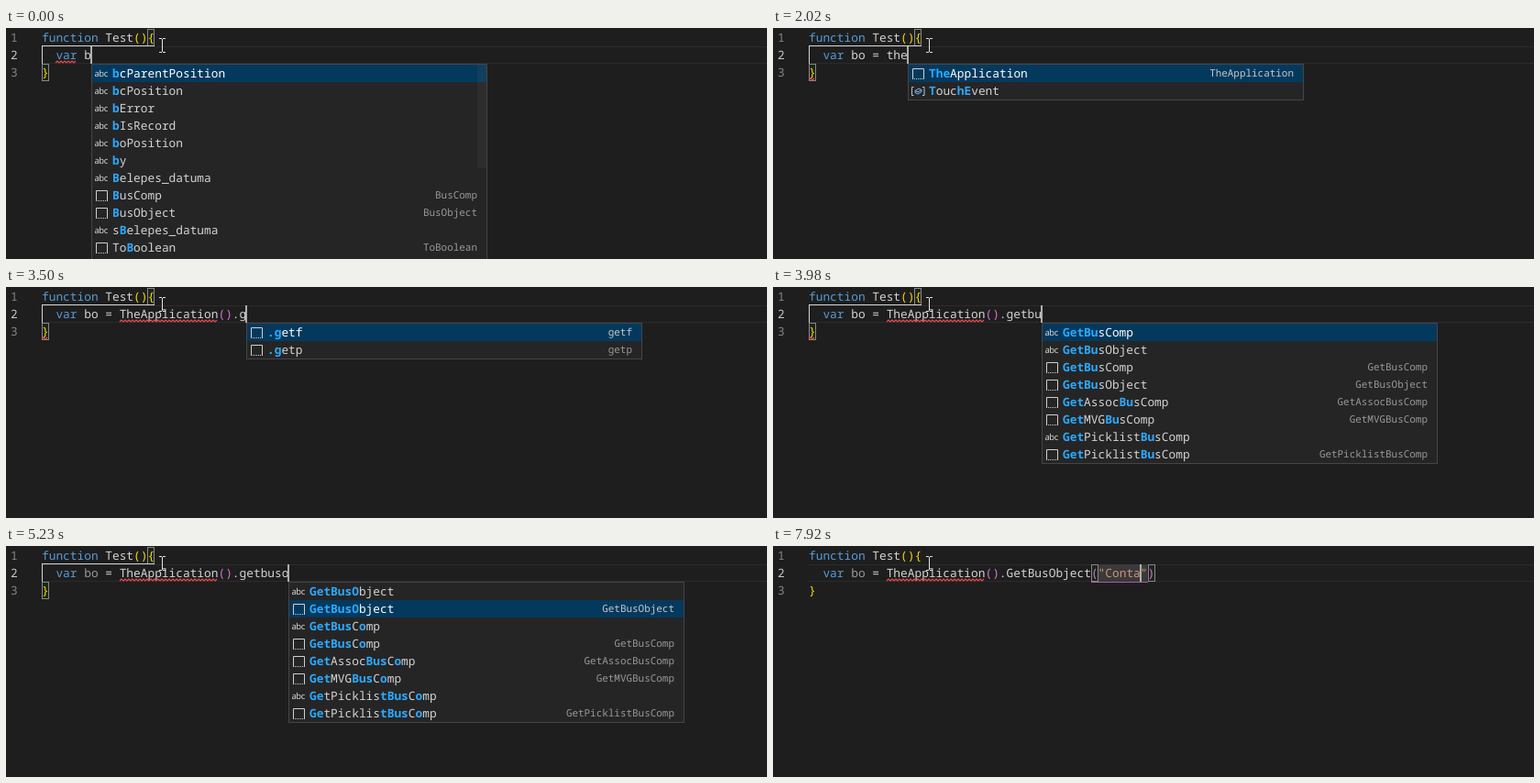
Write an HTML page that moves like this. It is 830 px wide and 252 px high and loops after 8 s.

```html
<!DOCTYPE html>
<html lang="en">
<head>
<meta charset="utf-8">
<title>Code completion</title>
<style>
  html, body { margin: 0; width: 100%; height: 100%; overflow: hidden; background: #1e1e1e; }
  svg { display: block; }
  text { font: 12.83px "Noto Sans Mono", "DejaVu Sans Mono", monospace; white-space: pre; text-rendering: geometricPrecision; fill: #d4d4d4; }
  .hit { fill: #2aaaff; font-weight: 700; }
  .detail { font-size: 10.95px; fill: #999; text-anchor: end; }
  .abc { font: 9.5px "Noto Sans", sans-serif; letter-spacing: -.5px; }
</style>
</head>
<body>
<svg id="stage" width="830" height="252" viewBox="0 0 830 252"></svg>
<script>
const LOOP = 8000, LEFT = 39, CHAR = 7.698, ROW = 19, POPUP_WIDTH = 432;
const BLUE = '#569cd6', GOLD = '#ffd700', ORCHID = '#da70d6', STRING = '#ce9178', RED = '#f14c4c';

// Label prefix: # snippet, @ event, none for a plain word.
const lists = {
  b: 'bcParentPosition bcPosition bError bIsRecord boPosition by Belepes_datuma #BusComp #BusObject sBelepes_datuma #ToBoolean #ToNumber',
  bo: 'boPosition bcParentPosition bcPosition bError bIsRecord #BusComp #BusObject #ToBoolean #GetBusComp #GetBusObject #GetAssocBusComp #GetMVGBusComp',
  th: '#TheApplication this throw @TouchEvent Math length match path',
  the: '#TheApplication @TouchEvent',
  app: '#TheApplication',
  dot: '#.getf #.getp #.setf #.setp #.try',
  get: '#.getf #.getp',
  bus: 'GetBusComp GetBusObject #GetBusComp #GetBusObject #GetAssocBusComp #GetMVGBusComp GetPicklistBusComp #GetPicklistBusComp',
  obj: 'GetBusObject #GetBusObject GetBusComp #GetBusComp #GetAssocBusComp #GetMVGBusComp GetPicklistBusComp #GetPicklistBusComp'
};

// [start, text with | as caret (¦ while blinked off), flags, list, selected row]
// flags: v/a/e squiggle under var/call/brace, g dimmed variable, p inner pair, m its match boxes
const APP = 'bo = TheApplication()', CALL = APP + '.GetBusObject(';
const steps = [
  [0, 'b|', 'v', 'b'],
  [150, 'bo|', 'v', 'bo'],
  [270, 'bo|', '', 'bo'],
  [540, 'bo |', 'g'],
  [950, 'bo =|', 'g'],
  [1210, 'bo = |', 'g'],
  [1610, 'bo = |', 'e'],
  [1760, 'bo = t|', 'e'],
  [1880, 'bo = th|', 'e', 'th'],
  [2020, 'bo = the|', 'e', 'the'],
  [2170, 'bo = thea|', 'e', 'app'],
  [2290, 'bo = theap|', 'e', 'app'],
  [2580, 'bo = TheApplication|', 'e'],
  [2710, 'bo = TheApplication(|)', 'gpm'],
  [2970, APP + '.|', 'g', 'dot'],
  [3220, APP + '.|', 'ae', 'dot'],
  [3370, APP + '.g|', 'ae'],
  [3500, APP + '.g|', 'ae', 'get'],
  [3620, APP + '.ge|', 'ae', 'get'],
  [3740, APP + '.get|', 'ae', 'get'],
  [3860, APP + '.getb|', 'ae', 'bus'],
  [3980, APP + '.getbu|', 'ae', 'bus'],
  [4100, APP + '.getbus|', 'ae', 'bus'],
  [4250, APP + '.getbuso|', 'ae', 'obj'],
  [4650, APP + '.getbuso|', 'ag', 'obj'],
  [4800, APP + '.getbuso¦', 'ag', 'obj'],
  [5230, APP + '.getbuso|', 'ag', 'obj', 1],
  [5380, CALL + '|)', 'agpm'],
  [5810, CALL + '"|")', 'agp'],
  [5940, CALL + '"|")', 'agpm'],
  [6350, CALL + '"¦")', 'agpm'],
  [6910, CALL + '"|")', 'agpm'],
  [7060, CALL + '"C|")', 'agpm'],
  [7340, CALL + '"Co|")', 'agpm'],
  [7640, CALL + '"Con|")', 'agpm'],
  [7790, CALL + '"Cont|")', 'agpm'],
  [7920, CALL + '"Conta|")', 'agpm']
];

const colX = col => LEFT + col * CHAR;
const rect = (x, y, w, h, fill) => `<rect x="${x}" y="${y}" width="${w}" height="${h}" fill="${fill}"/>`;
const stroke = (d, color, extra = '') => `<path d="${d}" fill="none" stroke="${color}" ${extra}/>`;
const span = (s, attr) => `<tspan ${attr}>${s}</tspan>`;
const ink = (s, color) => span(s, `style="fill:${color}"`);
const text = (x, y, s, attr = '') => `<text x="${x}" y="${y}" ${attr}>${s}</text>`;
const matchBox = (col, line) =>
  `<rect x="${Math.round(colX(col)) + .5}" y="${line * ROW + 1.5}" width="7" height="18" fill="rgba(0,100,0,.1)" stroke="#888"/>`;

function squiggle(from, to, line) {
  const y = line * ROW + 17, end = colX(to);
  let d = '';
  for (let x = Math.round(colX(from)), i = 0; x <= end; x += 2, i++) d += `${i ? 'L' : 'M'}${x} ${y + (i % 2 ? 0 : 2)}`;
  return stroke(d, RED, 'stroke-width="1.1"');
}

// Best fuzzy match: long unbroken runs score highest.
function match(label, word, from = 0) {
  if (!word) return { score: 0, hits: [] };
  let best = null;
  for (let i = from; i < label.length; i++) {
    let len = 0;
    while (len < word.length && label[i + len] === word[len]) len++;
    for (; len; len--) {
      const rest = match(label, word.slice(len), i + len);
      const score = rest && len * len + rest.score;
      if (rest && (!best || score > best.score))
        best = { score, hits: [...Array(len).keys()].map(k => i + k).concat(rest.hits) };
    }
  }
  return best;
}

function icon(kind, x, y) {
  if (kind === '#') {
    return stroke(`M${x + 5.5} ${y + 15}V${y + 4.5}H${x + 17.5}V${y + 15}`, '#d0d0d0') +
      stroke(`M${x + 5} ${y + 15.5}H${x + 18}`, '#d0d0d0', 'stroke-dasharray="1 1"');
  }
  if (kind === '@') {
    return stroke(`M${x + 6.5} ${y + 5.5}H${x + 4.5}V${y + 14.5}H${x + 6.5}M${x + 16} ${y + 5.5}H${x + 18}V${y + 14.5}H${x + 16}`, '#b8c4d0') +
      stroke(`M${x + 8} ${y + 9.5}L${x + 12} ${y + 7}L${x + 15} ${y + 8.5}V${y + 10.5}L${x + 11} ${y + 13}L${x + 8} ${y + 11.5}ZM${x + 8} ${y + 9.5}L${x + 11} ${y + 10.8}L${x + 15} ${y + 8.5}`, '#75beff');
  }
  return text(x + 3.5, y + 13, 'abc', 'class="abc"');
}

function popup(name, x, word, selected) {
  const items = lists[name].split(' ');
  let out = `<rect x="${x + .5}" y="39.5" width="${POPUP_WIDTH - 1}" height="${items.length * ROW + 1}" fill="#252526" stroke="#454545"/>`;
  items.forEach((item, row) => {
    const kind = '#@'.includes(item[0]) ? item[0] : '';
    const label = item.slice(kind.length), y = 40 + row * ROW, active = row === selected;
    const query = label[0] === '.' ? '.' + word : word;
    const found = match(label.toLowerCase(), query.toLowerCase());
    const hits = found ? found.hits : [];
    const letters = [...label].map((c, i) => hits.includes(i) ? span(c, 'class="hit"') : c).join('');
    if (active) out += rect(x + 1, y, POPUP_WIDTH - 2, ROW, '#04395e');
    out += icon(kind, x, y) + text(x + 23, y + 14, letters, active ? 'style="fill:#fff"' : '');
    if (kind === '#') out += text(x + 421, y + 13, label.replace('.', ''), `class="detail" ${active ? 'style="fill:#c8c8c8"' : ''}`);
  });
  if (items.length > 11) out += rect(x + 421, 40, 10, 113, 'rgba(121,121,121,.1)');
  return out;
}

function render([, source, flags, list, selected = 0]) {
  const has = f => flags.includes(f);
  const marked = '  var ' + source, caret = marked.search(/[|¦]/), line = marked.replace(/[|¦]/, '');
  const open = line.lastIndexOf('('), close = line.lastIndexOf(')');
  const x = Math.round(colX(caret));
  let out = rect(LEFT, 20, 791, 1, '#2b2b2b') + rect(LEFT, 38, 791, 1, '#2b2b2b');

  if (has('p')) {
    if (has('m')) {
      if (line.includes('"')) out += rect(colX(open + 1), 20, (close - open - 1) * CHAR, 19, '#3a3a3a');
      out += matchBox(open, 1) + matchBox(close, 1);
    }
    out += rect(Math.round(colX(open)), 39, Math.round((close - open) * CHAR), 1, '#a85aa5');
  } else {
    out += matchBox(15, 0) + matchBox(0, 2) + rect(LEFT, 19, 123, 1, '#d4d4d4') + rect(LEFT, 20, 1, 19, '#d4d4d4');
  }

  ['1', '2', '3'].forEach((n, i) => { out += text(5, 15 + i * ROW, n, `style="fill:${i === 1 ? '#c6c6c6' : '#858585'}"`); });
  out += text(LEFT, 15, ink('function', BLUE) + ' Test' + ink('(){', GOLD)) + text(LEFT, 53, ink('}', GOLD));

  const tokens = line.match(/^  var| bo\b|"[^"]*"|[()]|[^()"]+/g);
  out += text(LEFT, 34, tokens.map(t =>
    t === '  var' ? ink(t, BLUE) :
    t === ' bo' && has('g') ? ink(t, '#999') :
    t[0] === '"' ? ink(t, STRING) :
    '()'.includes(t) ? ink(t, ORCHID) : t).join(''));

  if (has('v')) out += squiggle(2, 5, 1);
  if (has('a')) out += squiggle(11, 25, 1);
  if (has('e')) out += squiggle(0, 1, 2);
  if (marked[caret] === '|') out += rect(x - 1, 20, 2, 19, '#aeafad');
  if (list) out += popup(list, x, line.slice(0, caret).match(/\w*$/)[0], selected);

  // mouse pointer
  return out + stroke('M167 11.5H170M171 11.5H174M170.5 12V26M167 26.5H170M171 26.5H174', '#e4e4e4');
}

const stage = document.getElementById('stage');
const start = performance.now();
let shown = -1;
function tick() {
  const t = (performance.now() - start) % LOOP;
  const index = steps.filter(step => step[0] <= t).length - 1;
  if (index !== shown) stage.innerHTML = render(steps[shown = index]);
  requestAnimationFrame(tick);
}
tick();
</script>
</body>
</html>
```
